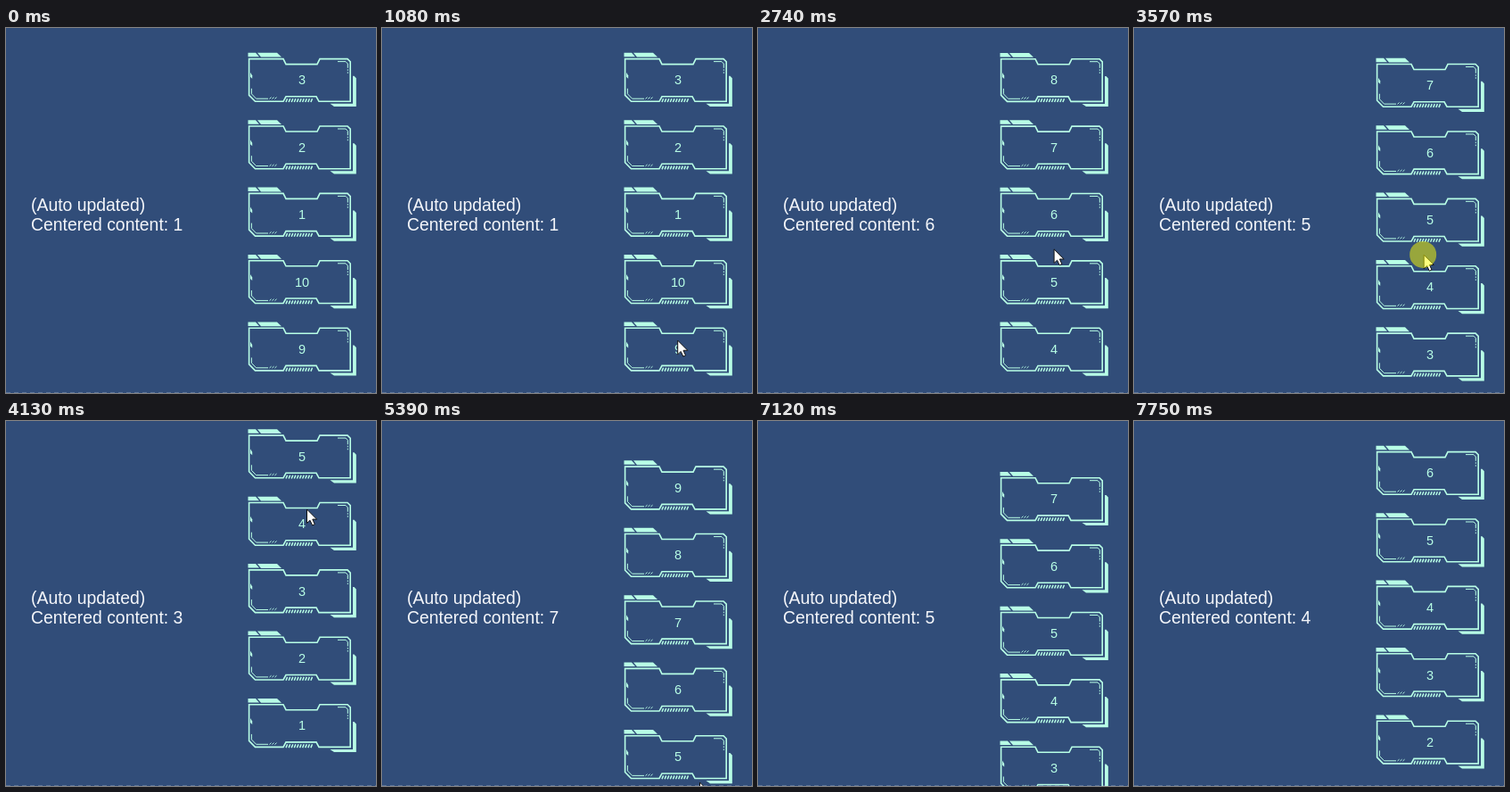
Write an HTML page with a canvas that moves like this. It is 415x409 px and loops after 8.34 s.

```html
<!DOCTYPE html>
<html lang="en">
<head>
<meta charset="utf-8">
<title>Circular scrolling list</title>
<style>
  html, body { margin: 0; width: 100%; height: 100%; overflow: hidden; background: #314d79; }
  canvas { display: block; }
</style>
</head>
<body>
<canvas id="stage" width="415" height="409"></canvas>
<script>
const ctx = document.getElementById('stage').getContext('2d');
const LOOP = 8340, W = 415, H = 409;
const COUNT = 10, PITCH = 75.4, MID_TOP = 178.6, MID_Y = 209;
const COAST = 740, LAG = 45;   // ms of glide after release; list delay behind the pointer
const BG = '#314d79', MINT = [184, 255, 230];
const FONT = '"Liberation Sans", Arial, sans-serif';

// Centre value goes from -> at while dragged, then coasts to rest.
const swipes = [
  { press: 1280, start: 1560, release: 2015, from: 1, at: -0.95, rest: -4, x: 330, y: 356, endX: 341 },
  { press: 3150, start: 3280, release: 4110, from: -4, at: -7.26, rest: -7, x: 318, y: 342, endX: 337 },
  { press: 4720, start: 4860, release: 5330, from: 3, at: 6.51, rest: 11, x: 337, y: 100, endX: 356 },
  { press: 6520, start: 6640, release: 6985, from: 11, at: 6.08, rest: 4, x: 357, y: 383, endX: 352 }
];
const entry = { t: 70, x: 334, y: 335 };

const clamp = v => Math.max(0, Math.min(1, v));
const mix = (a, b, k) => a + (b - a) * k;
const label = n => ((n - 1) % COUNT + COUNT) % COUNT + 1;

// The drag leaves rest smoothly and ends at the speed the coast begins with.
function swipeValue(s, t) {
  if (t >= s.release) {
    const left = 1 - clamp((t - s.release) / COAST);
    return mix(s.rest, s.at, left * left);
  }
  const time = s.release - s.start, x = clamp((t - s.start) / time);
  const m = Math.max(0, 2 * (s.rest - s.at) / COAST * time / (s.at - s.from));
  return mix(s.from, s.at, (3 - m) * x * x - (2 - m) * x * x * x);
}

function centreAt(t) {
  const s = swipes.filter(s => t >= s.start).pop() || swipes[0];
  return swipeValue(s, t);
}

function heldPoint(s, t) {
  const k = clamp((t - s.start) / (s.release - s.start));
  return { t, x: mix(s.x, s.endX, k), y: s.y + (swipeValue(s, t + LAG) - s.from) * PITCH };
}

function pointerAt(t) {
  const i = swipes.findIndex(s => t < s.release);
  if (i < 0 || t < entry.t) return null;
  const s = swipes[i];
  if (t >= s.press) return heldPoint(s, t);
  const a = i ? heldPoint(swipes[i - 1], swipes[i - 1].release) : entry;
  const k = ((t - a.t) / (s.press - a.t)) ** 2;
  return { x: mix(a.x, s.x, k), y: mix(a.y, s.y, k) };
}

// A card is tinted between press and the start of the drag.
function dimAt(t, n) {
  const s = swipes.find(s => t >= s.press && t < s.start);
  if (!s || n !== Math.round(s.from - (s.y - MID_Y) / PITCH)) return 0;
  return clamp((t - s.press) / 100);
}

function trace(points, close) {
  ctx.beginPath();
  for (let i = 0; i < points.length; i += 2) ctx.lineTo(points[i], points[i + 1]);
  if (close) ctx.closePath();
}
function fill(...points) { trace(points, true); ctx.fill(); }
function line(width, ...points) { ctx.lineWidth = width; trace(points); ctx.stroke(); }

function drawCard(top, text, dim) {
  const color = `rgb(${MINT.map(v => Math.round(v * (1 - 0.22 * dim)))})`;
  ctx.save();
  ctx.translate(271, top);
  ctx.fillStyle = ctx.strokeStyle = color;

  // top tab
  fill(0.5, 0, 9, 0, 13, 4.5, 0.5, 4.5);
  fill(11, 0, 33, 0, 38, 4.8, 15, 4.8);

  // frame
  ctx.lineWidth = 1.6;
  trace([1.6, 6.8, 40, 6.8, 43, 12.8, 78, 12.8, 81, 6.8, 112, 6.8, 115.2, 10,
    115.2, 54.5, 80, 54.5, 77, 49, 43, 49, 40, 54.5, 8.5, 54.5, 1.6, 47.5], true);
  ctx.stroke();

  // bottom hatch
  for (let x = 43; x < 73; x += 3.1) line(1.5, x, 55.2, x + 1.6, 51.4);

  // right and bottom bracket
  fill(118, 26, 119.5, 26, 121.8, 28.5, 121.8, 60.2, 97, 60.2, 92.5, 57, 118, 57);

  // inner details
  line(1, 101, 9.8, 110, 9.8, 112.3, 12.2, 112.3, 17);
  for (let y = 18.5; y < 24; y += 3) line(1, 112.3, y, 112.3, y + 1.5);
  fill(3, 22, 5.2, 25.5, 5.2, 29, 3, 27);
  line(1, 4.4, 40, 4.4, 46, 9.6, 51.4, 23, 51.4);
  for (let x = 24.5; x < 31; x += 3) line(1, x, 51.6, x + 2, 49.8);

  ctx.font = '14.5px ' + FONT;
  ctx.textAlign = 'center';
  ctx.fillText(text, 61, 35.5);
  ctx.restore();
}

function drawPointer({ x, y }, pressed) {
  ctx.save();
  ctx.translate(x, y);
  trace([0.5, 0.5, 0.5, 16, 4, 12.8, 6.6, 18.4, 9.3, 17.2, 6.8, 11.6, 11.6, 11.6], true);
  ctx.fillStyle = '#fff';
  ctx.fill();
  ctx.strokeStyle = '#111';
  ctx.lineWidth = 1;
  ctx.stroke();
  if (pressed) {
    ctx.fillStyle = 'rgba(255,255,0,0.5)';
    ctx.beginPath();
    ctx.arc(-0.5, 0.2, 15, 0, Math.PI * 2);
    ctx.fill();
  }
  ctx.restore();
}

function draw(t) {
  const centre = centreAt(t), mid = Math.round(centre);

  ctx.fillStyle = BG;
  ctx.fillRect(0, 0, W, H);

  ctx.strokeStyle = '#5d7599';
  ctx.setLineDash([5, 4]);
  line(1, 0, 408.5, W, 408.5);
  ctx.setLineDash([]);

  ctx.fillStyle = '#f4f6fa';
  ctx.font = '19.4px ' + FONT;
  ctx.textAlign = 'left';
  ctx.fillText('(Auto updated)', 28, 205);
  ctx.fillText('Centered content: ' + label(mid), 28, 227);

  for (let n = mid - 2; n <= mid + 2; n++) {
    drawCard(MID_TOP + (centre - n) * PITCH, label(n), dimAt(t, n));
  }

  const tip = pointerAt(t);
  if (tip) drawPointer(tip, swipes.some(s => t >= s.press && t < s.release));
}

const start = performance.now();
function tick() {
  draw((performance.now() - start) % LOOP);
  requestAnimationFrame(tick);
}
tick();
</script>
</body>
</html>
```
